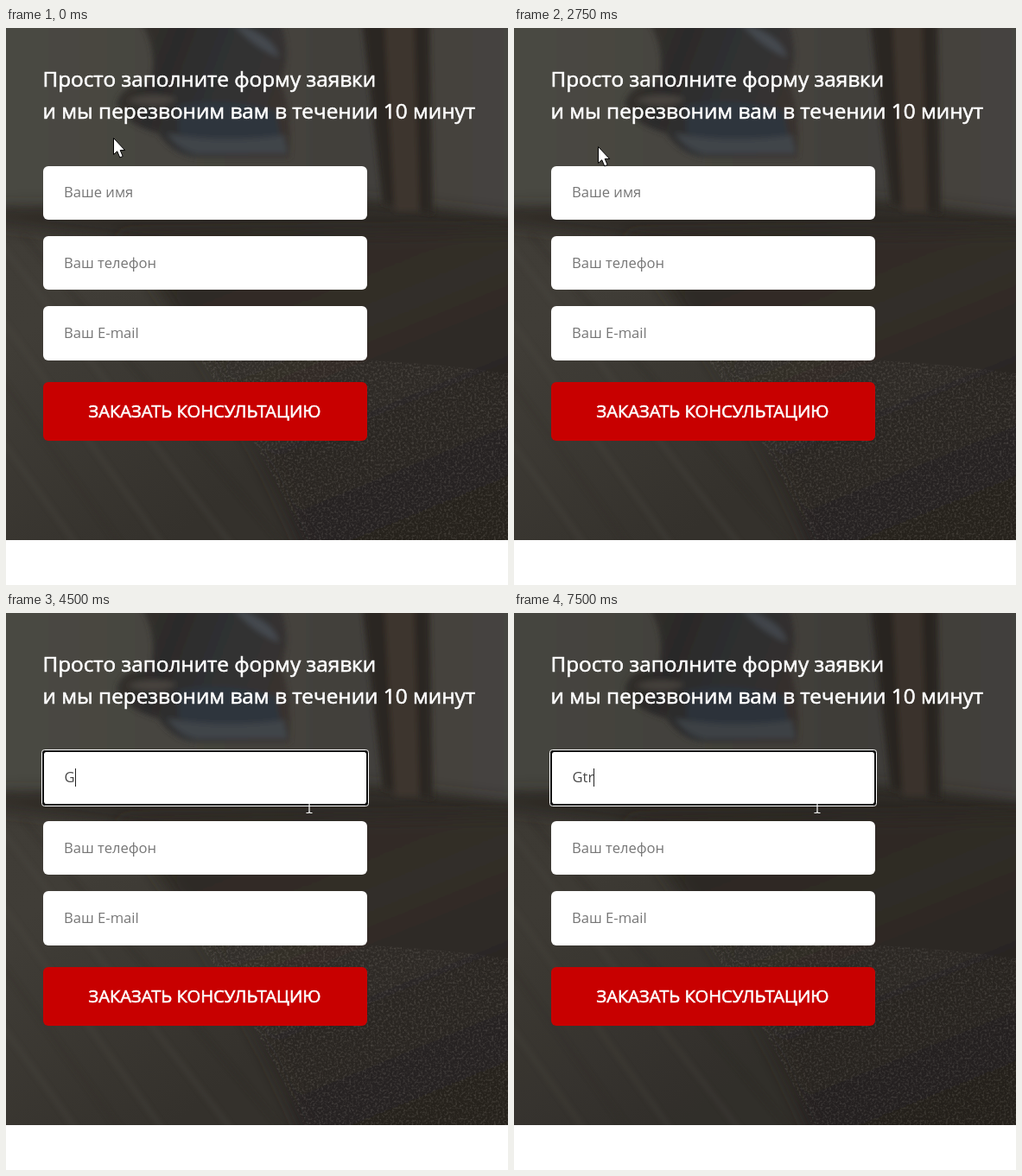
Write an HTML page that moves like this. It is 581 px wide and 645 px high and loops after 8 s.

```html
<!DOCTYPE html>
<html lang="ru">
<head>
<meta charset="utf-8">
<title>Форма заявки</title>
<style>
  html, body { margin: 0; width: 100%; height: 100%; overflow: hidden; background: #fff; }
  svg { display: block; width: 581px; height: 645px; }
  text { font-family: "Open Sans", "Noto Sans", sans-serif; }
  .head { font-size: 24.3px; fill: #fff; stroke: #fff; stroke-width: .6px; }
  .btn { font-size: 20.2px; fill: #fff; stroke: #fff; stroke-width: .6px; text-anchor: middle; }
  .hint, .typed { font-size: 16.6px; fill: #777; }
  .typed { fill: #484848; }

  .arrow, .beam, .ring, .name, .typed, .t, .r, .caret, .shade {
    animation: 8s step-end infinite;
  }
  .arrow { animation-name: arrow; }
  .beam { animation-name: beam; }
  .ring { animation-name: ring; }
  .name { animation-name: name; }
  .typed { animation-name: typed; }
  .t { animation-name: t; }
  .r { animation-name: r; }
  .caret { animation-name: caret; }
  .shade { animation-name: shade; }

  @keyframes arrow {
    0% { transform: translate(124px, 127px); visibility: visible; }
    3.125% { visibility: hidden; }
    6.25% { transform: translate(106px, 153px); visibility: visible; }
    9.375% { transform: translate(97px, 144px); }
    15.625% { transform: translate(97px, 131px); }
    28.125% { transform: translate(97px, 134px); }
    34.375% { transform: translate(97px, 137px); visibility: visible; }
    37.5%, 100% { transform: translate(97px, 137px); visibility: hidden; }
  }
  @keyframes beam {
    0% { transform: translate(125px, 194px); visibility: hidden; }
    3.125% { transform: translate(125px, 194px); visibility: visible; }
    6.25% { transform: translate(125px, 194px); visibility: hidden; }
    37.5% { transform: translate(131px, 172px); visibility: visible; }
    40.625% { transform: translate(294px, 214px); visibility: visible; }
    43.75%, 100% { transform: translate(351px, 222px); visibility: visible; }
  }
  @keyframes ring { 0% { visibility: hidden; } 37.5%, 100% { visibility: visible; } }
  @keyframes name { 0% { visibility: visible; } 56.25%, 100% { visibility: hidden; } }
  @keyframes typed { 0% { visibility: hidden; } 56.25%, 100% { visibility: visible; } }
  @keyframes t { 0% { visibility: hidden; } 62.5%, 100% { visibility: visible; } }
  @keyframes r { 0% { visibility: hidden; } 78.125%, 100% { visibility: visible; } }
  @keyframes shade { 0% { opacity: 0; } 93.75%, 100% { opacity: .05; } }
  @keyframes caret {
    0% { transform: translateX(68px); visibility: hidden; }
    37.5% { transform: translateX(68px); visibility: visible; }
    43.75% { transform: translateX(68px); visibility: hidden; }
    50% { transform: translateX(68px); visibility: visible; }
    56.25% { transform: translateX(80px); visibility: visible; }
    62.5% { transform: translateX(87px); visibility: visible; }
    68.75% { transform: translateX(87px); visibility: hidden; }
    78.125% { transform: translateX(92px); visibility: visible; }
    84.375% { transform: translateX(92px); visibility: hidden; }
    93.75%, 100% { transform: translateX(92px); visibility: visible; }
  }
</style>
</head>
<body>
<svg viewBox="0 0 581 645">
  <defs>
    <linearGradient id="wall" x2="1">
      <stop offset="0" stop-color="#4a4944"/>
      <stop offset=".65" stop-color="#43413b"/>
      <stop offset="1" stop-color="#454440"/>
    </linearGradient>
    <linearGradient id="floor" x1="0" y1="0" x2=".6" y2=".8">
      <stop offset="0" stop-color="#3f3c36"/>
      <stop offset=".5" stop-color="#403d37"/>
      <stop offset="1" stop-color="#34312c"/>
    </linearGradient>
    <linearGradient id="rug" x1="0" y1="0" x2=".5" y2="1">
      <stop offset="0" stop-color="#2c2721"/>
      <stop offset=".45" stop-color="#322e29"/>
      <stop offset="1" stop-color="#25211f"/>
    </linearGradient>
    <linearGradient id="metal" x2="1" y2=".3">
      <stop offset="0" stop-color="#38342f"/>
      <stop offset=".35" stop-color="#2c2b2a"/>
      <stop offset=".7" stop-color="#303133"/>
      <stop offset="1" stop-color="#37332f"/>
    </linearGradient>
    <filter id="soft" x="-20%" y="-20%" width="140%" height="140%"><feGaussianBlur stdDeviation="3"/></filter>
    <filter id="softer" x="-30%" y="-30%" width="160%" height="160%"><feGaussianBlur stdDeviation="9"/></filter>
    <filter id="grain" x="0" y="0" width="100%" height="100%">
      <feTurbulence type="fractalNoise" baseFrequency=".4" numOctaves="2" seed="4"/>
      <feColorMatrix values="0 0 0 0 .42  0 0 0 0 .39  0 0 0 0 .35  1.6 0 0 0 -.72"/>
      <feComposite operator="in" in2="SourceGraphic"/>
    </filter>
    <clipPath id="photo"><rect width="581" height="593"/></clipPath>
  </defs>

  <g clip-path="url(#photo)">
    <rect width="581" height="593" fill="url(#floor)"/>
    <path d="M-20-20H601V222L420 200L-20 208Z" fill="url(#wall)" filter="url(#soft)"/>
    <path d="M-20 208L420 200L601 222V300L260 262L-20 226Z" fill="#2b2721" opacity=".75" filter="url(#softer)"/>
    <path d="M130 240L601 235V620H350Q270 420 130 240Z" fill="url(#rug)" filter="url(#softer)"/>
    <path d="M225 385Q400 375 581 400V593H345Q300 490 225 385Z" filter="url(#grain)" opacity=".35"/>
    <g filter="url(#soft)">
      <path d="M412-10H490L494 216L436 204Z" fill="#2c2620"/>
      <path d="M438-10H472L478 212H450Z" fill="#3c352d"/>
      <path d="M154-10H316Q332 28 318 62Q332 100 328 150H222Q194 148 176 122Q134 110 128 88Q132 66 168 62Q176 22 154-10Z" fill="url(#metal)"/>
      <path d="M262-6Q310 8 316 34Q286 22 262-6Z" fill="#454a50"/>
      <path d="M200 90Q250 78 312 96L320 138Q250 144 200 122Z" fill="#2f353c"/>
      <path d="M186 122Q250 134 322 124L326 146H222Q200 142 186 122Z" fill="#3f444a"/>
      <path d="M140 84Q166 72 198 82Q176 98 140 84Z" fill="#46433e"/>
    </g>
    <g filter="url(#soft)" fill="none" stroke="#504d46" stroke-width="3" opacity=".5">
      <path d="M-10 330L190 610M-10 470L90 610M-10 245L270 610"/>
      <path d="M20 240L330 610" stroke="#2b2823"/>
      <path d="M-10 400L140 610" stroke="#302d28"/>
    </g>
    <rect class="shade" width="581" height="593" fill="#100c08"/>
  </g>

  <text class="head" x="42.5" y="68">Просто заполните форму заявки</text>
  <text class="head" x="42.5" y="105">и мы перезвоним вам в течении 10 минут</text>

  <g fill="#fff">
    <rect x="43" y="160" width="375" height="62" rx="6"/>
    <rect x="43" y="241" width="375" height="62" rx="6"/>
    <rect x="43" y="322" width="375" height="63" rx="6"/>
  </g>
  <rect x="43" y="410" width="375" height="68" rx="6" fill="#c80000"/>
  <g class="ring" fill="none">
    <rect x="41.5" y="158.5" width="378" height="65" rx="3" stroke="#fff"/>
    <rect x="43" y="160" width="375" height="62" rx="3" stroke="#101010" stroke-width="2"/>
  </g>

  <text class="hint name" x="67" y="196">Ваше имя</text>
  <text class="hint" x="67" y="278">Ваш телефон</text>
  <text class="hint" x="67" y="359">Ваш E-mail</text>
  <text class="typed" x="67.5" y="196">G<tspan class="t">t</tspan><tspan class="r">r</tspan></text>
  <rect class="caret" y="180" width="1" height="21" fill="#222"/>
  <text class="btn" x="230" y="451">ЗАКАЗАТЬ КОНСУЛЬТАЦИЮ</text>

  <path class="arrow" d="M.5.5V19.5L4.7 15.8L7.8 23L11.2 21.5L8.2 14.6H13.7Z" fill="#fff" stroke="#000"/>
  <path class="beam" d="M-3.5-8.5H-1L0-7.5L1-8.5H3.5M0-7.5V8.5M-3.5 9.5H-1L0 8.5L1 9.5H3.5" fill="none" stroke="#fff" stroke-width="1.2"/>
</svg>
</body>
</html>
```
